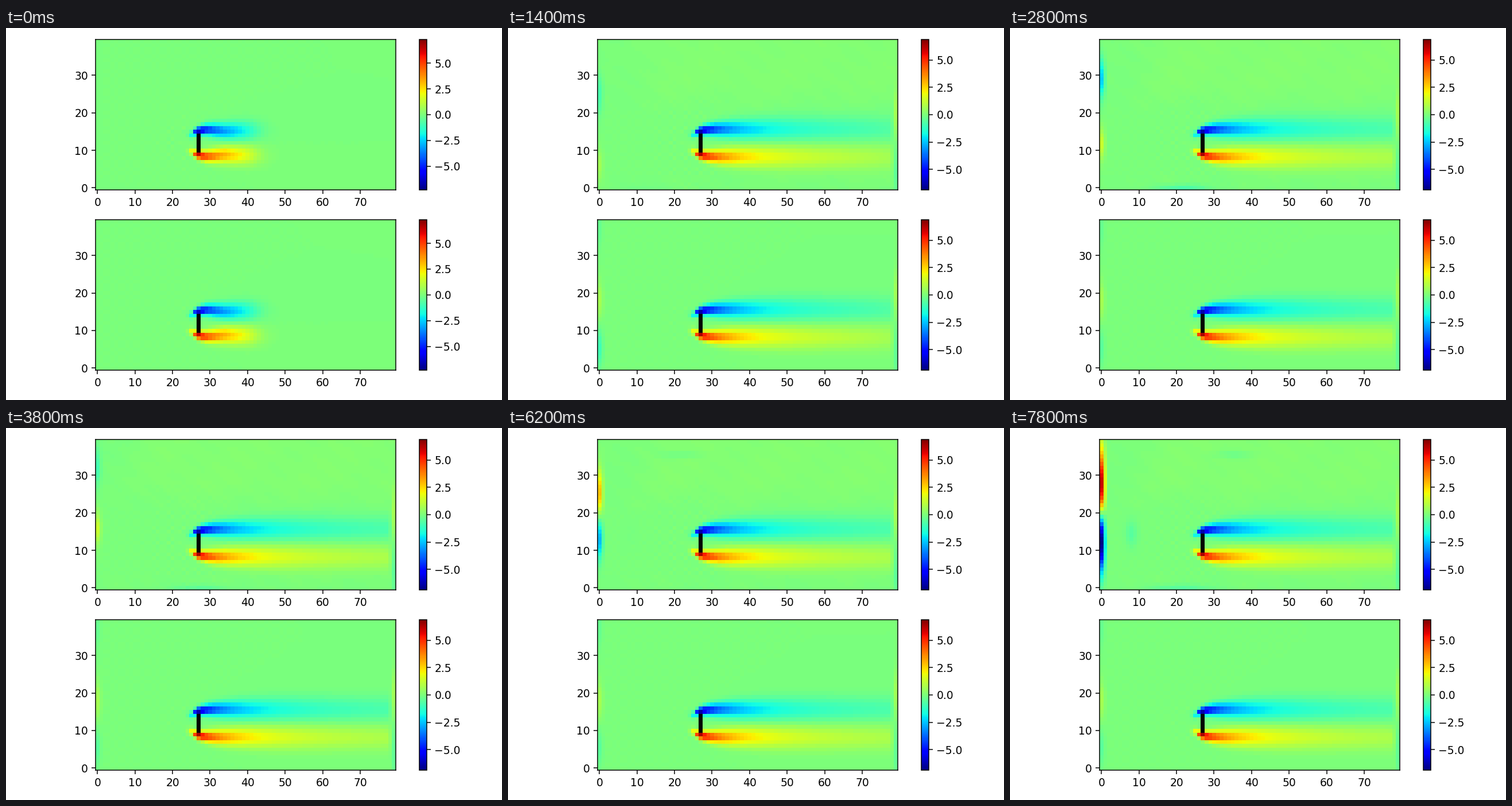
Write a matplotlib script that moves like this. It is 864 px wide and 648 px high and loops after 8 s.

```python
import numpy as np
import matplotlib.pyplot as plt
from matplotlib.animation import FuncAnimation

W, H, DPI = 864, 648, 135
FRAMES, STEP = 40, 200
NX, NY = 80, 40
AXIS, PLATE_X = 12, 27          # wake axis row and plate column
X, Y = np.meshgrid(np.arange(NX), np.arange(NY))
PLATE = (X == PLATE_X) & (abs(Y - AXIS) <= 2)


def bump(v, center, width):
    return np.exp(-((v - center) / width) ** 2)


def ramp(k, start, length):
    """Smooth step from 0 to 1."""
    s = np.clip((k - start) / length, 0, 1)
    return s * s * (3 - 2 * s)


def limit(k):
    return 6.86 + 0.42 * np.exp(-k / 1.5) * (k < 7)


def wake(k):
    """Two opposite shear layers shed from the plate tips, swept downstream."""
    d = np.maximum(X - PLATE_X, 0)
    strength = 6.6 / (1 + d / 7) * bump(np.minimum(X, PLATE_X), PLATE_X, 1.8)
    front = 0.5 * (1 - np.tanh((X - 42 - 6.2 * k) / (4 + 0.8 * k)))
    outlet = np.clip((NX - 1 - X) / 2, 0, 1)

    spread = 0.6 + 1.9 * (1 - np.exp(-np.maximum(X - 26, 0) / 13))
    offset = 3.7 - 1.5 * np.exp(-np.maximum(X - 25, 0) / 1.8)
    offset -= 0.5 * np.exp(-k / 2.5) * np.clip((X - 29) / 5, 0, 1)

    def layer(center):
        return np.exp(-((Y - center) / spread) ** 2 / 2)

    return strength * front * outlet * (layer(AXIS - offset) - layer(AXIS + offset))


def ripples(amp, reach):
    spots = np.cos(2.3 * (X - PLATE_X)) * np.cos(2.3 * (Y - AXIS))
    r = np.hypot(X - 24, Y - AXIS)
    away = np.hypot(X - PLATE_X, Y - AXIS) > 4.5
    return amp * spots * bump(r, 0, reach) * away


def outlet_edge(k, amp):
    rows = bump(Y, 20, 6) - 0.7 * bump(Y, 4, 7)
    return amp * min(k / 7, 1) * rows * (X == NX - 1)


def inlet(rows):
    """Put a row profile on the first column, leaking into the second."""
    return rows * ((X == 0) + 0.28 * (X == 1))


def inlet_waves(k):
    surge = ramp(k, 27, 11)
    crest = (1.3 * min(k / 14, 1) + 5 * surge) * bump(
        Y, min(11 + 0.8 * (k - 13), 27), 4 + 5.5 * surge)
    trough = 2.4 * bump(k, 13, 6) * bump(Y, 25 + 0.6 * (k - 7), 5)
    backflow = (0.6 * ramp(k, 19, 7) + 6.8 * surge) * bump(Y, 13, 4 + 4 * surge)
    return crest - trough - backflow


def upper_field(k):
    grow = min(k / 8, 1)
    f = wake(k) + ripples(0.16, 8 + 4 * grow) + outlet_edge(k, 0.65)
    f += inlet(inlet_waves(k))

    # faint mottled haze far above the plate
    haze = 0.14 * np.clip((Y - 20) / 8, 0, 1) * np.clip((X - 6) / 12, 0, 1)
    mottle = np.sin(0.45 * (X - 1.6 * k) + 0.3 * Y) * np.sin(0.55 * Y + 0.2 * X)
    f += grow * (haze + 0.05 * mottle * (abs(Y - AXIS) > 8))

    # weak eddies drifting along the walls, and one growing near the inlet
    floor = bump(k, 15, 6) * bump(X, 13 + 1.2 * (k - 7), 7)
    floor += 0.7 * ramp(k, 30, 9) * bump(X, 21, 9)
    f -= 0.8 * floor * bump(Y, 0, 0.9)
    f -= 0.35 * ramp(k, 18, 8) * bump(X, 13 + 1.7 * (k - 26), 5) * bump(Y, 35.5, 1)
    f -= 0.6 * ramp(k, 29, 10) * bump(X, 8, 1.6) * bump(Y, 14.5, 3.5)
    return f


def lower_field(k):
    grow = min(k / 6, 1)
    edge = 0.7 * bump(Y, 18, 5) - 0.35 * bump(Y, 37, 5)
    edge -= (0.55 + 0.45 * bump(k, 7, 3)) * bump(Y, 5.5, 5)
    return wake(k) + ripples(0.12, 7) + outlet_edge(k, 0.6) + inlet(grow * edge)


fig, axes = plt.subplots(2, 1, figsize=(W / DPI, H / DPI), dpi=DPI,
                         facecolor="white")
cmap = plt.get_cmap("jet").copy()
cmap.set_bad("black")


def panel(ax):
    im = ax.imshow(np.zeros((NY, NX)), origin="lower", cmap=cmap,
                   interpolation="nearest", vmin=-limit(0), vmax=limit(0))
    ax.set_xticks(range(0, NX, 10))
    ax.set_yticks(range(0, NY, 10))
    fig.colorbar(im, ax=ax, ticks=np.arange(-5, 5.1, 2.5))
    return im


panels = list(zip(map(panel, axes), (upper_field, lower_field)))
fig.tight_layout()


def update(k):
    for im, field in panels:
        im.set_data(np.ma.masked_where(PLATE, field(k)))
        im.set_clim(-limit(k), limit(k))
    return [im for im, _ in panels]


anim = FuncAnimation(fig, update, frames=FRAMES, interval=STEP,
                     init_func=lambda: update(0), repeat=True, repeat_delay=0)
plt.show()
```
